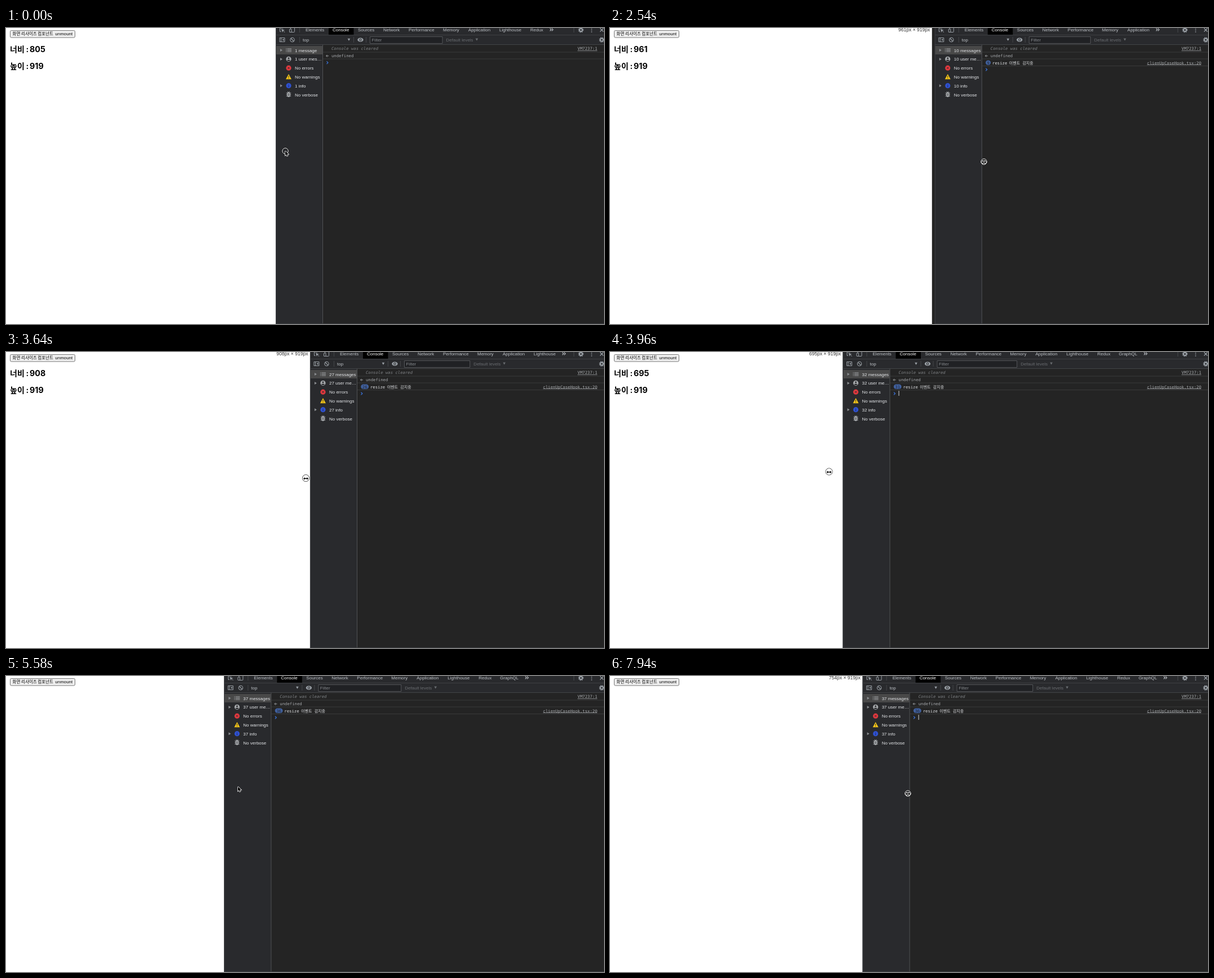
Animation of 1062 by 527 pixels, one loop 8 s. Source, as an HTML page with a canvas:

```html
<!DOCTYPE html>
<html lang="ko">
<head>
<meta charset="utf-8">
<style>
html, body { margin: 0; width: 100%; height: 100%; overflow: hidden; background: #fff; }
canvas { display: block; }
</style>
</head>
<body>
<canvas id="stage" width="1062" height="527"></canvas>
<script>
const W = 1062, H = 527, LOOP = 8000, SCALE = 0.595;
const c = document.getElementById('stage').getContext('2d');
const SANS = '"Liberation Sans", Arial, sans-serif';
const MONO = '7.27px "DejaVu Sans Mono", monospace';
const KOREAN = '"Noto Sans CJK KR", "Noto Sans CJK", sans-serif';
const UI = '8px ' + SANS;

// tick, page width, lag of the panel behind the page edge, resize events
const panelKeys = [
  [0, 805, 0, 0], [14, 805, 0, 0], [17, 961, 5, 9], [19, 1110, 4, 16], [20, 1153, 2.5, 19],
  [21, 1153, 2.5, 19], [22, 1120, 0, 21], [26, 695, 0, 31], [27, 651, 0, 36],
  [51, 651, 0, 36], [52, 682, 0, 36], [53, 754, 0, 36]];
// tick, x, y
const pointerKeys = [
  [0, 496, 219], [1, 497, 221], [4, 499, 224], [6, 486, 222], [8, 478, 220], [11, 480, 220],
  [13, 480, 220], [14, 541, 231], [17, 664, 238], [18, 684, 238], [21, 690, 238], [22, 676, 236],
  [26, 389, 213], [28, 389, 212], [31, 70, 11], [33, 70, 11], [35, 400, 168], [36, 418, 166],
  [37, 412, 197], [40, 392, 207], [43, 388, 210], [51, 388, 212], [52, 462, 211], [53, 529, 209]];
const caretSpans = [[1, 4], [8, 11], [14, 17], [21, 24], [26, 32], [49, 54]];
const pressSpans = [[0, 1], [11, 28], [32, 33], [49, 54]];
const tabs = [['Elements', 53], ['Console', 101], ['Sources', 146], ['Network', 191], ['Performance', 236],
  ['Memory', 297], ['Application', 342], ['Lighthouse', 397], ['Redux', 452], ['GraphQL', 490]];

const within = (spans, n) => spans.some(([a, b]) => n >= a && n < b);

function sample(keys, n) {
  const i = Math.max(1, keys.findIndex(k => k[0] >= n));
  const a = keys[i - 1], b = keys[i], p = (n - a[0]) / (b[0] - a[0]);
  return a.slice(1).map((v, j) => v + (b[j + 1] - v) * p);
}

function tickAt(ms) {
  const s = ms + 8;
  return Math.floor(s < 2060 ? s / 146.9 : s < 4110 ? 14 + (s - 2060) / 157.7 : 27 + (s - 4110) / 147.3);
}

function rect(x, y, w, h, color) { c.fillStyle = color; c.fillRect(x, y, w, h); }

function text(str, x, y, color, font = UI, align = 'left') {
  c.font = font; c.fillStyle = color; c.textAlign = align;
  c.fillText(str, x, y);
}

function line(points, color, width = 1) {
  c.beginPath();
  points.forEach(([x, y]) => c.lineTo(x, y));
  c.strokeStyle = color; c.lineWidth = width; c.stroke();
}

function shape(points, color) {
  c.beginPath();
  points.forEach(([x, y]) => c.lineTo(x, y));
  c.closePath(); c.fillStyle = color; c.fill();
}

function disc(x, y, r, color) {
  c.beginPath(); c.arc(x, y, r, 0, 7); c.fillStyle = color; c.fill();
}

function ring(x, y, r, color, width = 1) {
  c.beginPath(); c.arc(x, y, r, 0, 7); c.strokeStyle = color; c.lineWidth = width; c.stroke();
}

function box(x, y, w, h, r, fill, stroke) {
  c.beginPath(); c.roundRect(x, y, w, h, r);
  if (fill) { c.fillStyle = fill; c.fill(); }
  if (stroke) { c.strokeStyle = stroke; c.lineWidth = 1; c.stroke(); }
}

const chevron = (x, y, r, color, dir = 1, width = 1.2) =>
  line([[x - r * dir / 2, y - r], [x + r * dir / 2, y], [x - r * dir / 2, y + r]], color, width);
const dropdown = (x, y, color) => shape([[x - 2.3, y - 2], [x + 2.3, y - 2], [x, y + 2.3]], color);

function gear(x, y) {
  ring(x, y, 2.6, '#9aa0a6', 2);
  c.setLineDash([1.7, 1.5]);
  ring(x, y, 4, '#9aa0a6', 1.4);
  c.setLineDash([]);
}

function link(str, y) {
  text(str, 1050, y, '#a8abae', MONO, 'right');
  rect(1050 - c.measureText(str).width, y + 0.8, c.measureText(str).width, 0.7, '#a8abae');
}

function drawPage(width, mounted, showSize) {
  const edge = width * SCALE;
  rect(0, 0, edge, H, '#fff');
  box(7.5, 4.5, 115, 12.5, 2, '#efefef', '#767676');
  text('화면 리사이즈 컴포넌트', 11.5, 13.3, '#000', '7.5px ' + KOREAN);
  text('unmount', 87.3, 13.2, '#000', '7.94px ' + SANS);
  if (mounted) {
    [['너비', Math.round(width), 43], ['높이', 919, 73]].forEach(([label, value, y]) => {
      text(label, 7, y, '#000', 'bold 14px ' + KOREAN);
      text(':', 35.4, y, '#000', 'bold 14.3px Inter, sans-serif');
      text(value, 42, y, '#000', 'bold 14.3px Inter, sans-serif');
    });
  }
  if (showSize) text(Math.round(width) + 'px × 919px', edge - 3.5, 5.7, '#333', '8.55px ' + SANS, 'right');
}

function drawToolbar(x) {
  const gray = '#9aa0a6', rule = '#45474a';
  rect(x, 0, W - x, 30, '#292a2d');
  rect(x + 94, 0, 44.5, 12, '#000');
  rect(x, 12, W - x, 1, '#3e4043');

  line([[x + 13.5, 0], [x + 7.5, 0], [x + 7.5, 6.5], [x + 9.5, 6.5]], gray);
  shape([[x + 10, 1.5], [x + 16, 4], [x + 13.2, 5], [x + 12, 8]], gray);
  line([[x + 14, 5.5], [x + 16, 7.8]], gray);
  box(x + 26.5, -2.5, 7, 10, 1, null, gray);
  box(x + 24.5, 2, 3.5, 5.5, 0.5, '#292a2d', gray);
  rect(x + 42, 0, 1, 8, rule);

  let end = 0;
  for (const [name, dx] of tabs) {
    c.font = UI;
    const right = x + dx + c.measureText(name).width;
    if (right > 985) break;
    text(name, x + dx, 6, name === 'Console' ? '#fff' : '#bdc1c6');
    end = right;
  }
  chevron(end + 13, 3, 2.3, '#bdc1c6');
  chevron(end + 16.2, 3, 2.3, '#bdc1c6');
  rect(1008, 0, 1, 8, rule);
  gear(1021, 3.5);
  [0, 3.4, 6.8].forEach(y => disc(1040, y, 0.9, gray));
  line([[1055, 0.5], [1061, 6.5]], gray, 1.2);
  line([[1061, 0.5], [1055, 6.5]], gray, 1.2);

  box(x + 7, 17.5, 9, 7, 0, null, gray);
  rect(x + 9, 17.5, 1, 7, gray);
  shape([[x + 14.5, 19], [x + 14.5, 23], [x + 11.5, 21]], gray);
  ring(x + 29.5, 21, 3.7, gray, 1.1);
  line([[x + 27, 18.5], [x + 32, 23.5]], gray, 1.1);
  [42, 138, 160].forEach(dx => rect(x + dx, 16, 1, 10, rule));
  text('top', x + 48, 24, '#bdc1c6');
  dropdown(x + 130, 20.7, gray);
  c.beginPath(); c.ellipse(x + 150.5, 21, 5.2, 3.5, 0, 0, 7); c.fillStyle = gray; c.fill();
  disc(x + 150.5, 21, 2.3, '#292a2d');
  disc(x + 150.5, 21, 1.3, gray);

  const filterWidth = 110 + (W - x - 485) * 0.2;
  box(x + 167.5, 15.5, filterWidth - 1, 12, 0, '#202124', '#55575a');
  text('Filter', x + 170.5, 24.3, '#85898d');
  text('Default levels', x + 173 + filterWidth, 23.7, '#696c70');
  dropdown(x + 226 + filterWidth + 1.5, 20.5, '#696c70');
  gear(1058, 21);
  rect(x, 29, W - x, 1, '#424447');
}

function drawSidebar(x, count) {
  const gray = '#a5a8ab', ix = x + 23;
  rect(x, 30, 83, H - 30, '#292a2d');
  rect(x, 32, 83, 15, '#484848');
  rect(x + 83, 30, 1, H - 30, '#525457');
  const labels = [count + (count > 1 ? ' messages' : ' message'), count + (count > 9 ? ' user me…' : ' user mes…'),
    'No errors', 'No warnings', count + ' info', 'No verbose'];
  labels.forEach((label, i) => {
    const y = 39.6 + i * 15.8;
    text(label, x + 34, y + 2.9, '#e3e5e8');
    if (i < 2 || i === 4) shape([[x + 8, y - 2.5], [x + 12, y], [x + 8, y + 2.5]], '#8b8e91');
  });

  [37, 39.5, 42].forEach(y => {
    rect(ix - 5, y - 0.5, 1.3, 1, gray);
    rect(ix - 2.6, y - 0.5, 7.6, 1, gray);
  });
  disc(ix, 55.3, 4.6, gray);
  disc(ix, 53.8, 1.5, '#292a2d');
  c.beginPath(); c.ellipse(ix, 57.7, 2.8, 1.3, 0, 0, 7); c.fill();
  disc(ix, 71.2, 4.6, '#e0383e');
  line([[ix - 1.6, 69.6], [ix + 1.6, 72.8]], '#292a2d');
  line([[ix + 1.6, 69.6], [ix - 1.6, 72.8]], '#292a2d');
  shape([[ix, 82], [ix + 5, 91.3], [ix - 5, 91.3]], '#f5c518');
  rect(ix - 0.5, 85, 1, 3.2, '#292a2d');
  rect(ix - 0.5, 89, 1, 1, '#292a2d');
  disc(ix, 102.7, 4.6, '#2f51d0');
  rect(ix - 0.5, 100.3, 1, 1, '#202b55');
  rect(ix - 0.5, 102, 1, 3.3, '#202b55');
  [115.8, 118.5, 121.2].forEach(y => rect(ix - 4.2, y - 0.5, 8.4, 1, gray));
  box(ix - 2.7, 114.3, 5.4, 8.6, 2.6, gray);
  line([[ix - 2, 113], [ix, 115], [ix + 2, 113]], gray);
  rect(ix - 1.2, 117, 2.4, 0.9, '#292a2d');
  rect(ix - 1.2, 119.3, 2.4, 0.9, '#292a2d');
}

function drawConsole(x, events, caret) {
  const left = x + 84, tx = x + 99, promptY = events ? 74 : 61.8;
  rect(left, 30, W - left, H - 30, '#242424');
  (events ? [42.5, 54.5, 67] : [42.5, 54.5]).forEach(y => rect(left, y, W - left, 1, '#393a3b'));
  text('Console was cleared', tx, 39.4, '#7e8184', 'italic ' + MONO);
  link('VM7237:1', 39.4);
  chevron(x + 90.5, 49.7, 2, '#9a9da0', -1, 1);
  rect(x + 90, 49.2, 4, 1, '#9a9da0');
  text('undefined', tx, 52.2, '#a5a8ab', MONO);
  if (events) {
    const wide = events > 9, shift = x + (wide ? 107 : 102.3);
    box(x + 90.3, 57.6, wide ? 13.8 : 9, 8.4, 4.2, '#41619f');
    text(events, x + (wide ? 97.2 : 94.8), 64.5, '#20242c', MONO, 'center');
    text('resize', shift, 64.5, '#dfe1e4', MONO);
    text('이벤트', shift + 29.7, 64.5, '#dfe1e4', '7px ' + KOREAN);
    text('감지중', shift + 53.3, 64.5, '#dfe1e4', '7px ' + KOREAN);
    link('clienUpCaseHook.tsx:20', 64.5);
  }
  chevron(x + 91.7, promptY, 2.4, '#3b78e7');
  if (caret) rect(tx, promptY - 5, 1, 9, '#d5d7da');
}

function drawPointer(x, y, resizing, pressed) {
  if (pressed) {
    ring(x, y, 6, '#000', 0.9);
    ring(x, y, 5.3, '#fff', 0.9);
  }
  const outline = resizing
    ? [[-4.5, 0.8], [-2, -1.6], [-2, 0.1], [2, 0.1], [2, -1.6], [4.5, 0.8], [2, 3.2], [2, 1.5], [-2, 1.5], [-2, 3.2]]
    : [[0, 0], [0, 7.8], [1.8, 6.2], [3, 9], [4.4, 8.4], [3.2, 5.7], [5.6, 5.6]];
  const points = outline.map(([dx, dy]) => [x + dx, y + dy]);
  line([...points, points[0]], '#fff', 1.5);
  shape(points, '#000');
}

function draw(now) {
  const tick = tickAt(now % LOOP);
  const [width, lag, events] = sample(panelKeys, tick);
  const [px, py] = sample(pointerKeys, tick);
  const x = width * SCALE + lag, resizes = Math.round(events);
  rect(0, 0, W, H, '#242424');
  drawPage(width, tick < 32, within([[15, 33], [52, 54]], tick));
  drawConsole(x, resizes, within(caretSpans, tick));
  drawSidebar(x, resizes + 1);
  drawToolbar(x);
  rect(x, 0, 1, H, '#3c3e41');
  rect(x, H - 1, W - x, 1, '#3c3e41');
  drawPointer(px, py, within([[7, 28], [42, 54]], tick), within(pressSpans, tick));
  requestAnimationFrame(draw);
}
requestAnimationFrame(draw);
</script>
</body>
</html>
```
